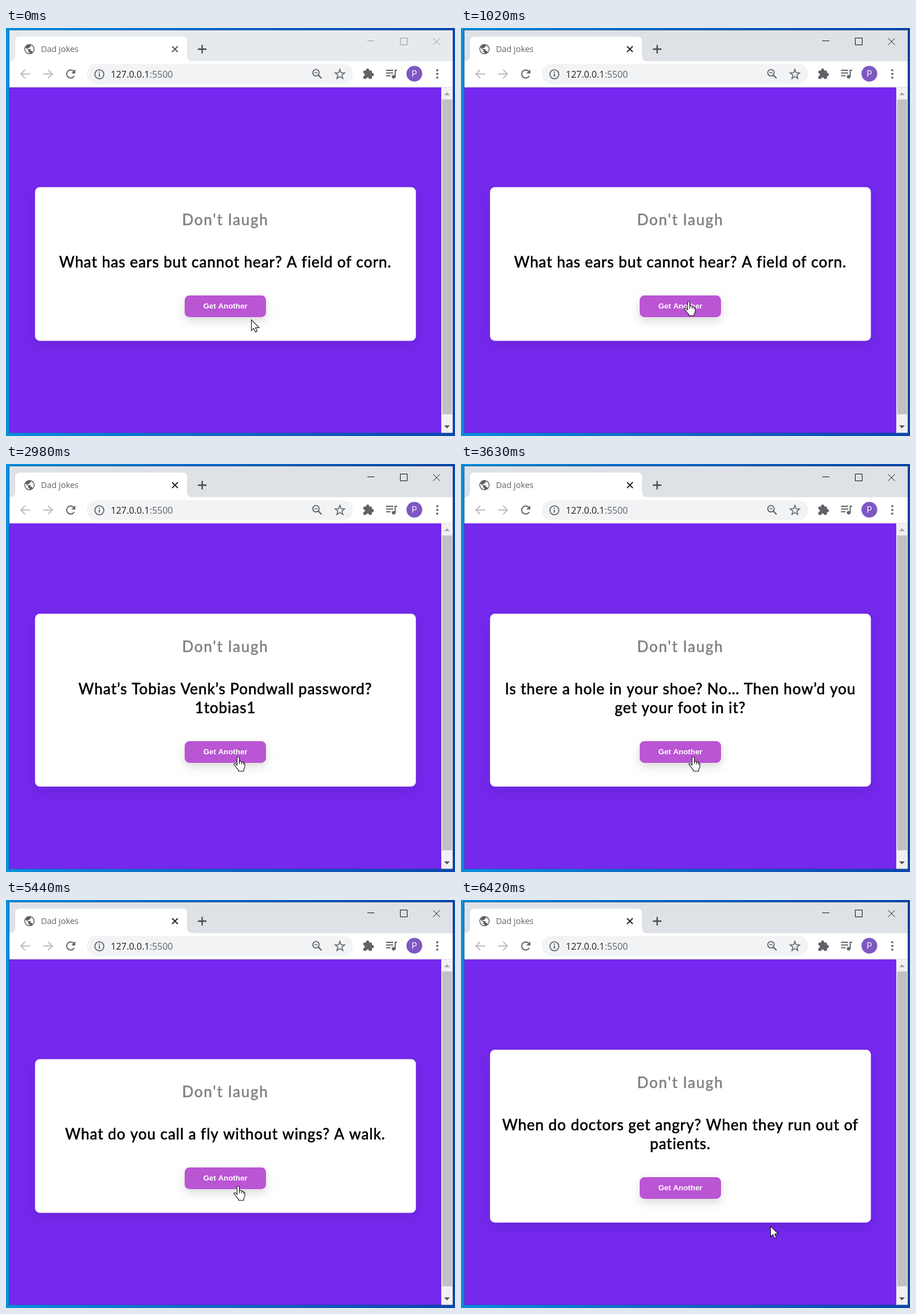
These frames come from a looping animation (784x714 px, 6470 ms). An HTML page with a canvas:

```html
<!DOCTYPE html>
<html lang="en">
<head>
<meta charset="utf-8">
<title>Dad jokes</title>
<style>
  html, body { margin: 0; width: 100%; height: 100%; overflow: hidden; }
  canvas { display: block; }
</style>
</head>
<body>
<canvas id="stage" width="784" height="714"></canvas>
<script>
const ctx = document.getElementById('stage').getContext('2d');
const LOOP = 6470;
const ICON = '#5f6368';
const UI_FONT = '"Open Sans", "Noto Sans", sans-serif';
const JOKE_FONT = 'Lato, "Open Sans", sans-serif';

const jokes = [
  [0, ['What has ears but cannot hear? A field of corn.']],
  [1700, ['What’s Tobias Venk’s Pondwall password?', '1tobias1']],
  [3630, ['Is there a hole in your shoe? No… Then how’d you', 'get your foot in it?']],
  [4720, ['What do you call a fly without wings? A walk.']],
  [6200, ['When do doctors get angry? When they run out of', 'patients.']]
];
const presses = [[780, 1020], [2810, 2980], [4230, 4450], [5740, 6000]];

// time, x, y of the pointer tip
const pointerKeys = [
  [0, 428, 510], [30, 428, 510], [400, 396, 463], [600, 397, 478],
  [2340, 397, 478], [2530, 405, 512], [5215, 405, 512], [5440, 405, 500],
  [5590, 405, 499], [5980, 405, 499], [6420, 540, 570]
];

const arrow = new Path2D('M.5 .5V19.5L4.7 15.6L7.6 22L10.5 20.7L7.7 14.5H14Z');
const hand = new Path2D('M-1.5 2Q-1.5 .5 .5 .5T2.5 2V8.6Q3.2 8 4.8 8.2T6.5 9.8Q7.8 9 9 9.8T10 11.3' +
  'Q12 11 12 13.2V18Q11.8 20 10 22.4V25.5H1V23.5Q-1 22 -3.5 18.3Q-5 15.8 -6.6 14.6Q-7.6 13 -6 12.3Q-4.3 12 -1.5 15.2Z');
const knuckles = new Path2D('M2.5 8.6V13M6.5 9.8V13.3M10 11.3V14');

const mix = (a, b, k) => a + (b - a) * k;
const grey = (a, b, k) => { const v = Math.round(mix(a, b, k)); return `rgb(${v},${v},${v})`; };

function rect(x, y, w, h, color) {
  ctx.fillStyle = color;
  ctx.fillRect(x, y, w, h);
}
function roundRect(x, y, w, h, r, color) {
  ctx.beginPath();
  ctx.roundRect(x, y, w, h, r);
  ctx.fillStyle = color;
  ctx.fill();
}
function disc(x, y, r, color) {
  ctx.beginPath();
  ctx.arc(x, y, r, 0, 7);
  ctx.fillStyle = color;
  ctx.fill();
}
function fill(path, color) {
  ctx.fillStyle = color;
  ctx.fill(new Path2D(path));
}
function line(path, color = ICON, width = 2) {
  ctx.strokeStyle = color;
  ctx.lineWidth = width;
  ctx.stroke(new Path2D(path));
}
function ring(x, y, r, width, from = 0, to = 7) {
  ctx.beginPath();
  ctx.arc(x, y, r, from, to);
  ctx.strokeStyle = ICON;
  ctx.lineWidth = width;
  ctx.stroke();
}
function text(str, x, y, font, color, align = 'left', spacing = 0, embolden = 0) {
  ctx.font = font;
  ctx.textAlign = align;
  ctx.letterSpacing = spacing + 'px';
  ctx.fillStyle = color;
  ctx.fillText(str, x, y);
  if (embolden) {
    ctx.strokeStyle = color;
    ctx.lineWidth = embolden;
    ctx.lineJoin = 'round';
    ctx.strokeText(str, x, y);
    ctx.lineJoin = 'miter';
  }
  ctx.letterSpacing = '0px';
}
function shadowed(offset, blur, alpha, draw) {
  ctx.save();
  ctx.shadowColor = `rgba(0,0,0,${alpha})`;
  ctx.shadowOffsetY = offset;
  ctx.shadowBlur = blur;
  draw();
  ctx.restore();
}

function drawDesktop(focus) {
  const sky = ctx.createLinearGradient(0, 0, 784, 0);
  sky.addColorStop(0, '#0a8fdc');
  sky.addColorStop(.35, '#0a6ecb');
  sky.addColorStop(1, '#0a47af');
  rect(0, 0, 784, 714, sky);
  ctx.strokeStyle = `rgba(10,30,80,${mix(.2, .4, focus)})`;
  ctx.lineWidth = 1;
  ctx.strokeRect(5.5, 3.5, 775, 705);
}

function drawTabs(focus) {
  const bar = `rgb(${mix(231, 222, focus)},${mix(234, 225, focus)},${mix(237, 230, focus)})`;
  rect(6, 4, 774, 54, bar);
  fill('M6 58Q16 58 16 48V23Q16 15 24 15H308Q316 15 316 23V48Q316 58 326 58Z', '#fff');

  disc(41, 37, 9, ICON);
  fill('M34 34L39 39V41L41 43V44.5Q34 43 33.5 37ZM43 30Q48 32 48.5 37Q48.5 40 46.5 42L45 40H43V37H38V35H41V33H43Z', '#fff');
  text('Dad jokes', 61, 42, '14.4px ' + UI_FONT, ICON);

  line('M290 32L300 42M300 32L290 42', grey(85, 35, focus), 1.9);
  line('M335 37H350M342.5 29.5V44.5', '#45484b', 2.3);

  const control = grey(150, 15, focus);
  line('M631 22.5H643M688.5 17.5H700.5V29.5H688.5ZM746 18L757.5 29.5M757.5 18L746 29.5', control, 1);
}

function drawToolbar() {
  rect(6, 58, 774, 46, '#fff');
  rect(6, 103, 774, 1, '#dfe1e5');
  line('M42 80.5H26.5M33.5 73L26 80.5L33.5 88M65 80.5H80.5M73.5 73L81 80.5L73.5 88', '#b9bbbe', 1.9);
  ring(113, 80.5, 7, 2, .5, 5.5);
  fill('M121 72.5V79.5H114Z', ICON);

  roundRect(141, 63, 465, 35, 17.5, '#f1f3f4');
  ring(163, 81, 7.8, 1.8);
  rect(162, 80, 2, 5, ICON);
  rect(162, 76.5, 2, 2, ICON);
  const urlFont = '16px ' + UI_FONT;
  text('127.0.0.1', 183, 87, urlFont, '#202124');
  text(':5500', 183 + ctx.measureText('127.0.0.1').width, 87, urlFont, ICON);

  ring(541.2, 78.3, 5.6, 1.8);
  line('M545.4 82.5L551 88.2', ICON, 2.3);
  line('M538.5 78.3H544', ICON, 1.5);

  ctx.beginPath();
  for (let i = 0; i < 10; i++) {
    const r = i % 2 ? 3.7 : 8.8, a = i * Math.PI / 5 - Math.PI / 2;
    ctx.lineTo(583 + r * Math.cos(a), 81.2 + r * Math.sin(a));
  }
  ctx.closePath();
  ctx.strokeStyle = ICON;
  ctx.lineWidth = 1.6;
  ctx.stroke();

  roundRect(624, 74.5, 15, 14.5, 1.5, ICON);
  disc(631.5, 74, 2.9, ICON);
  disc(639.3, 81.5, 2.9, ICON);
  disc(624.3, 81.7, 2.4, '#fff');
  disc(631.5, 89, 2.4, '#fff');

  line('M663.5 74H676M663.5 78.7H676M663.5 83.4H671.5M679.5 86V74H683', ICON, 2);
  disc(676.8, 85.3, 3.1, ICON);

  disc(713, 80, 13.8, '#7e57c2');
  text('P', 713, 85, '14px Roboto, sans-serif', '#fff', 'center');
  for (const y of [73.8, 80.3, 86.8]) disc(753, y, 1.9, ICON);
}

function drawPage() {
  rect(6, 104, 754, 604.5, '#7528ee');
  rect(760, 104, 20, 604.5, '#f1f1f1');
  rect(761.5, 125, 17.5, 551, '#c1c1c1');
  fill('M765 117.5L770 112.5L775 117.5Z', '#a3a3a3');
  fill('M765 695.5L770 700.5L775 695.5Z', '#505050');
}

function layoutAt(t) {
  const lines = jokes.findLast(([start]) => t >= start)[1];
  const tall = lines.length > 1;
  const top = tall ? 262 : 278.5;
  const bottom = tall ? 564.5 : 547.5;
  return { lines, top, bottom, button: Math.round(bottom - 79.8) };
}

function drawCard({ lines, top, bottom, button }, pressed) {
  shadowed(7, 25, .1, () => roundRect(50.7, top, 665, bottom - top, 8.3, '#fff'));
  text("Don't laugh", 383, top + 66.5, '26px ' + JOKE_FONT, '#808080', 'center', 1.8, .6);
  lines.forEach((str, i) =>
    text(str, 383, top + 140.5 + i * 33.3, '26px ' + JOKE_FONT, '#000', 'center', .95, .65));

  ctx.save();
  if (pressed) {
    ctx.translate(383, button + 19);
    ctx.scale(.98, .98);
    ctx.translate(-383, -button - 19);
  }
  shadowed(6.5, 15, .14, () => roundRect(312, button, 142, 38, 8.3, '#ba55d3'));
  text('Get Another', 383, button + 23, 'bold 13.33px "Liberation Sans", Arial, sans-serif', '#fff', 'center');
  ctx.restore();
}

function pointerAt(t) {
  const next = pointerKeys.findIndex(([time]) => time > t);
  if (next < 0) return pointerKeys.at(-1).slice(1);
  const [t0, x0, y0] = pointerKeys[next - 1];
  const [t1, x1, y1] = pointerKeys[next];
  const k = (t - t0) / (t1 - t0), eased = k * k * (3 - 2 * k);
  return [Math.round(mix(x0, x1, eased)), Math.round(mix(y0, y1, eased))];
}

function drawPointer(t) {
  const [x, y] = pointerAt(t);
  // The pointer shape reacts slightly before the new layout is painted.
  const { button } = layoutAt(t + 30);
  const over = x >= 312 && x < 454 && y >= button && y < button + 38;
  const shape = over ? hand : arrow;
  ctx.save();
  ctx.translate(x, y);
  ctx.fillStyle = '#fff';
  ctx.fill(shape);
  ctx.strokeStyle = '#111';
  ctx.lineWidth = 1.1;
  ctx.stroke(shape);
  if (over) ctx.stroke(knuckles);
  ctx.restore();
}

function render(now) {
  const t = now % LOOP;
  const focus = t < 780 ? 0 : t < 830 ? .4 : t < 880 ? .75 : 1;
  drawDesktop(focus);
  drawTabs(focus);
  drawToolbar();
  drawPage();
  drawCard(layoutAt(t), presses.some(([down, up]) => t >= down && t < up));
  drawPointer(t);
}

const start = performance.now();
function tick() {
  render(performance.now() - start);
  requestAnimationFrame(tick);
}
tick();
</script>
</body>
</html>
```
